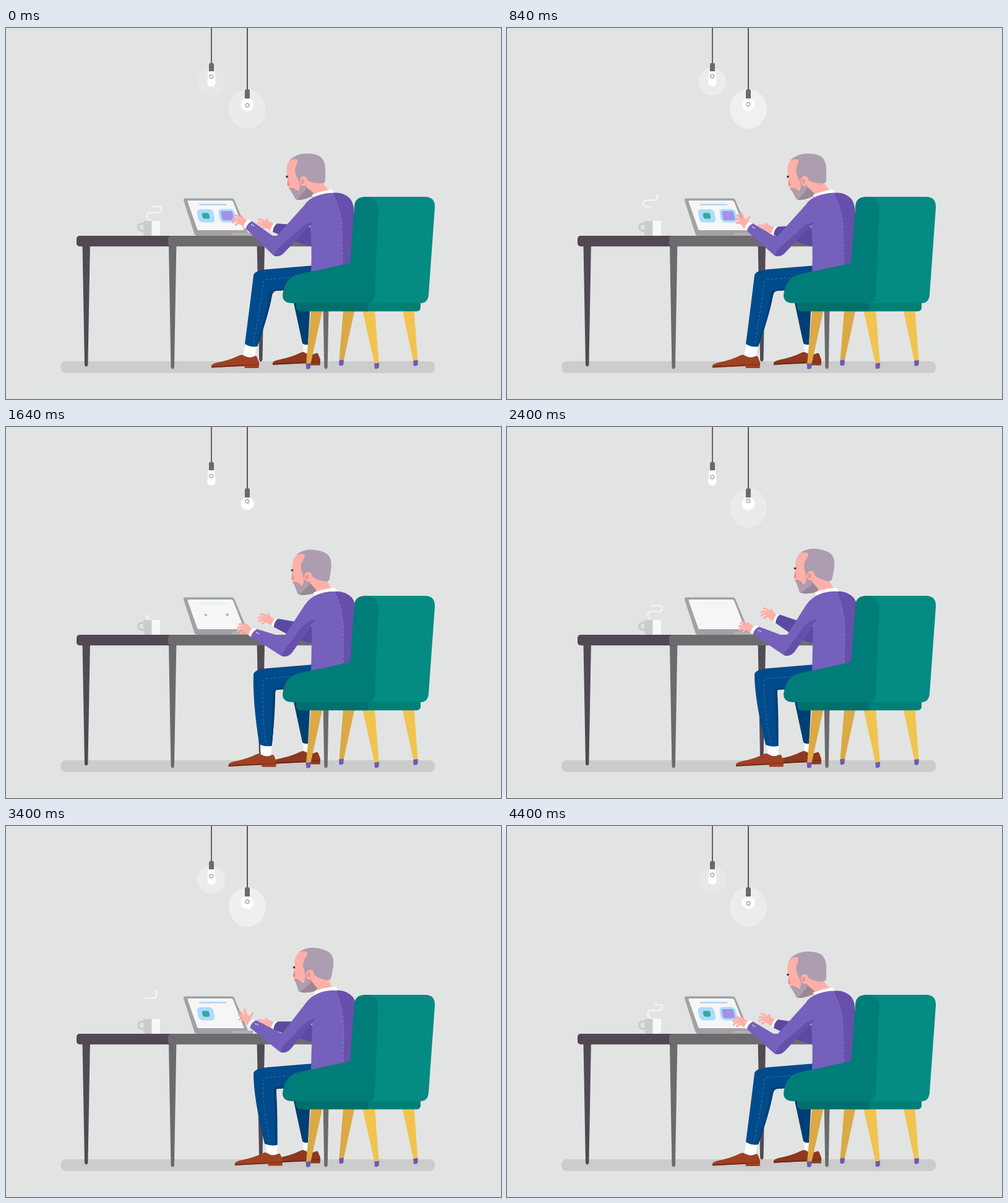
Write an HTML page with a canvas that moves like this. It is 800 by 600 pixels and loops after 4.48 s.

```html
<!DOCTYPE html>
<html lang="en">
<head>
<meta charset="utf-8">
<title>Working at the desk</title>
<style>
html, body { margin: 0; width: 100%; height: 100%; overflow: hidden; background: #e2e4e3; }
canvas { display: block; }
</style>
</head>
<body>
<canvas id="stage" width="800" height="600"></canvas>
<script>
const LOOP = 4480;
const g = document.getElementById('stage').getContext('2d');
const SKIN = '#ffb0a8', PURPLE = '#7560bc', SHADE = '#6650ab';

const mix = (a, b, k) => a + (b - a) * k;
const wave = (t, period, peak) => Math.cos(2 * Math.PI * (t - peak) / period);
const ease = (t, from, to) => {
  const k = Math.min(1, Math.max(0, (t - from) / (to - from)));
  return (1 - Math.cos(Math.PI * k)) / 2;
};

// Linear value between [time, value] pairs
function track(t, keys) {
  if (t <= keys[0][0]) return keys[0][1];
  for (let i = 1; i < keys.length; i++) {
    const [t0, a] = keys[i - 1], [t1, b] = keys[i];
    if (t <= t1) return mix(a, b, (t - t0) / (t1 - t0));
  }
  return keys[keys.length - 1][1];
}

function fill(color, d) {
  g.fillStyle = color;
  g.fill(new Path2D(d));
}

function line(color, width, d, dash = []) {
  g.strokeStyle = color;
  g.lineWidth = width;
  g.setLineDash(dash);
  g.stroke(new Path2D(d));
  g.setLineDash([]);
}

function box(color, x, y, w, h, r) {
  g.fillStyle = color;
  g.beginPath();
  g.roundRect(x, y, w, h, r);
  g.fill();
}

function oval(color, x, y, rx, ry = rx) {
  g.fillStyle = color;
  g.beginPath();
  g.ellipse(x, y, rx, ry, 0, 0, 7);
  g.fill();
}

function ring(x, y) {
  g.strokeStyle = '#77777a';
  g.lineWidth = 1;
  g.beginPath();
  g.arc(x, y, 3, 0, 7);
  g.stroke();
}

function lamps(t) {
  const glow1 = track(t, [[0, .14], [400, .28], [840, .32], [1500, 0], [2600, 0], [3200, .3], [3840, .26], [4480, .14]]);
  const glow2 = track(t, [[0, .28], [840, .42], [1640, .04], [1900, .04], [2400, .22], [3100, .42], [3840, .36], [4480, .28]]);
  oval(`rgba(255,255,255,${glow1})`, 331.7, 87, 22.5);
  oval(`rgba(255,255,255,${glow2})`, 390, 131, 30, 32);
  box('#6d5f66', 331, 0, 2, 58, 0);
  box('#58575b', 389, 0, 2, 101, 0);
  fill('#fff', 'M327 69 H336.5 L338.5 88 Q338.5 94.5 332 94.5 Q325 94.5 325.3 88 Z');
  oval('#fff', 390, 123.7, 10.6);
  box('#6a6a6d', 328, 56.5, 8, 13.5, [3, 3, 0, 0]);
  box('#6a6a6d', 386, 99, 8, 15, [3, 3, 0, 0]);
  ring(331.8, 79.8 + 1.8 * wave(t, LOOP, 2900));
  ring(390, 122.2 + 2.9 * wave(t, LOOP, 0));
}

const STEAM = 'M238 313 Q229 311 228 306 Q226 299 233 298.5 H245 Q251 298 251 293.5 Q251 289 246 289 H227 Q220 289 220 284 Q220 278.5 226 278.5 H238 Q243 278 243 273 V265';
const steamPath = document.createElementNS('http://www.w3.org/2000/svg', 'path');
steamPath.setAttribute('d', STEAM);
const steamLength = steamPath.getTotalLength();

function steam(t) {
  const half = LOOP / 2;
  for (const u of [t % half, t % half + half]) {
    const head = track(u, [[1480, 0], [1640, .13], [2160, .5], [2400, .55], [3080, .96], [3150, 1]]);
    const tail = track(u, [[2160, 0], [2400, .06], [3080, .54], [3400, .74], [3860, 1]]);
    if (head <= tail) continue;
    const a = tail * steamLength, b = head * steamLength;
    line('#f3f4f4', 2.6, STEAM, [0, a, b - a, 2 * steamLength]);
  }
}

function mug() {
  g.strokeStyle = '#cbcccc';
  g.lineWidth = 3.6;
  g.beginPath();
  g.roundRect(214, 316.5, 15, 11.5, 5.5);
  g.stroke();
  box('#cbcccc', 222, 312, 15, 24, [1, 0, 0, 4]);
  box('#f8f8f8', 235.5, 312, 13.5, 24, [0, 1, 4, 0]);
}

function table() {
  box('#cbcccb', 88.5, 539, 604.5, 19, 8);
  const leg = (color, x, bottom) => fill(color,
    `M${x - 6.2} 350 H${x + 6.2} L${x + 2.7} ${bottom - 3} Q${x} ${bottom + 2} ${x - 2.7} ${bottom - 3} Z`);
  leg('#524a54', 129.7, 548);
  leg('#6b6a6e', 269.2, 552);
  leg('#524a54', 411.8, 540);
  leg('#6b6a6e', 517, 552);
  box('#524853', 114, 336, 160, 17.2, 5);
  box('#6d6b70', 262, 336, 258, 17.2, 5);
}

function icon(x, y, size, color, w, h) {
  if (size <= 0) return;
  g.save();
  g.transform(1, 0, .2, 1, x, y);
  g.scale(size, size);
  box('#abdcfc', -13.2, -10.8, 26.4, 21.6, 6);
  box(color, -w / 2, -h / 2, w, h, 3);
  g.restore();
}

function laptop(t) {
  fill('#a2a2a4', 'M290 275.5 H365 Q368 275.5 369 278 L391 331 H399 V336 H309 Q305.5 336 304.5 333 L287 279 Q286.5 275.5 290 275.5 Z');
  fill('#f6f6f7', 'M295 279 H364 Q366 279 367 281 L385 327 H311 Q309.5 327 309 325 L293.5 281 Q293 279 295 279 Z');
  box('#b0b0b2', 366, 331, 32, 4.5, 1);
  const bar = track(t, [[1360, 1], [1700, .3], [2400, .35], [2750, 1]]);
  g.globalAlpha = bar;
  box('#abdcfc', 312, 285.7 - 1.4 * bar, 44.5, 2.8 * bar, 1.2 * bar);
  g.globalAlpha = 1;
  const out = [[1360, 1], [1700, 0]];
  icon(323, 303.8, track(t, [...out, [2950, 0], [3150, 1.1], [3260, 1]]), '#39a79c', 11.5, 9.5);
  icon(357.8, 303.6, track(t, [...out, [3450, 0], [3780, 1.11], [3930, 1]]), '#a193ea', 19, 15);
}

// Hand with its wrist at x, y; open spreads the fingers
function hand(x, y, angle, open) {
  g.save();
  g.translate(x, y);
  g.rotate(angle * Math.PI / 180);
  g.lineCap = 'round';
  const finger = (bx, by, cx, cy, tx, ty) => line(SKIN, 3.4, `M${bx} ${by} Q${cx} ${cy} ${tx} ${ty}`);
  finger(-9, -10, -15, -15, mix(-20, -17, open), mix(-13, -19, open));
  finger(-11, -8, -19, -11, mix(-22, -22, open), mix(-7.5, -13, open));
  finger(-11, -5, -19, -7, mix(-22, -22, open), mix(-2, -7, open));
  finger(-8, -2, -14, -3, mix(-17, -19, open), mix(1, -1, open));
  finger(-4, -6, -5, -10, mix(-9, -2, open), mix(-12, -17.5, open));
  fill(SKIN, 'M3 -5 Q-2 -10 -8 -12 Q-13 -12 -14 -8 Q-15 -3 -10 0 Q-6 4 -2 4 Z');
  g.lineCap = 'butt';
  g.restore();
}

function farArm(p, s) {
  const k = 1 - s;
  const x = mix(436, 437 + 2 * k, p);
  const y = mix(321.5 - 9.5 * k, 316.5 - 13 * k, p);
  hand(x - 6, y + 6, mix(-20, 4, k), .3);
  fill('#fff', `M${x - 3} ${y - .5} L${x + 2} ${y + 1} L${x - 4} ${y + 14} L${x - 9} ${y + 11} Q${x - 7} ${y + 4} ${x - 3} ${y - .5} Z`);
  const by = mix(352, 348, p);
  fill('#5a4aa2', `M${x + 2} ${y} L478 ${mix(319, 316, p)} L503 325 V${by + 2} L488 ${by} L470 ${by - 6} L${x - 5} ${y + 13.5} Q${x - 4} ${y + 4} ${x + 2} ${y} Z`);
}

function shoe(dx, dy, main, sole) {
  g.save();
  g.translate(dx, dy);
  fill(main, 'M332 546 Q333 543 342 541 Q362 537 376 530 Q381 527 385 530 Q393 535 401 531 Q405 529 406 533 L409 541 V546 L332 549 Z');
  fill(sole, 'M332 547 L409 543.5 V545 L332 549.5 Z');
  fill(main, 'M385 545.5 L409 544.5 L408.5 550 H386 Z');
  g.restore();
}

function legs(p) {
  fill('#fff', 'M480 509 L489 509 L488 526 Q483 528 481 524 Z');
  shoe(99, -4.5, '#8d381f', '#6d2a1b');
  fill('#003f74', 'M464 440 H492 L488 512 Q482 513 479 510 Z');
  const m = (a, b) => mix(a, b, p);
  fill('#fff', `M${m(387, 420)} 512 L${m(405, 439)} 513 L${m(402, 438)} 531 Q${m(393, 430)} 535 ${m(383, 422)} 530 Z`);
  shoe(38 * p, -.5 * p, '#9f4123', '#7c2d1d');
  const inner = `${m(430, 436)} ${m(432, 429)} Q${m(432, 436)} 425 ${m(437, 440)} 425 L452 424`;
  fill('#004b8c', `M498 384 L425 390 Q401 392 400 400 Q${m(394, 400)} ${m(450, 440)} ${m(386, 418)} ${m(511, 514)} Q${m(396, 428)} ${m(517, 518)} ${m(406, 438.5)} ${m(515, 516)} Q${m(424, 438)} ${m(465, 470)} ${inner} L498 424 Z`);
  fill('#003f74', `M${m(404, 436)} 515 Q${m(421, 434)} 465 ${m(427, 433)} 424 L452 420 V424 L437 425 Q${m(432, 437)} 425 ${m(430, 437)} 432 Q${m(424, 439)} 465 ${m(406, 438.5)} 515 Z`);
  line('#3a77ad', .9, `M472 402.5 L419 407 Q416 408 415.5 413 Q${m(410, 415)} 460 ${m(399, 427)} 513`, [4, 3]);
}

function head(p) {
  g.save();
  g.translate(470 + 5 * p, 277 - 9.5 * p);
  g.rotate(.175 * p);
  g.translate(-470, -277);
  fill(SKIN, 'M478 245 H513 L511 252 Q516 258 526 265 L498 277 L484 262 Z');
  fill(SKIN, 'M470 209 Q456 212 454 222 Q452 232 455 241 L454.5 254 Q457 257 458 262 L478 268 L484 240 V212 Z');
  fill('#ef8a8c', 'M455.5 244 L458.5 254 Q456 257 454.5 254.5 Z');
  fill('#3a3157', 'M452 239.5 L455.5 238.5 V242 Q452 243 452 239.5 Z');
  fill('#9a8795', 'M458 259 Q464 257 469 262 Q474 266 475 258 L477 249 L497 266 L494 272 Q482 278 473 278 Q467 278 466 273 Z');
  fill('#ad9db0', 'M457 215 Q468 203 486 203 Q505 203 511 211 Q517 219 516 235 L515.5 248 Q514 252 508 251.5 Q495 251 488 247 L484 262 L470 278 Q467 277 466 272 L458 259 Q463 258 468 262 Q474 266 475 258 Q475 250 470 241 Q465 232 469 223 Q473 214 470 212.5 Q464 211 457 215 Z');
  fill('#9a8795', 'M475 274 Q484 270 489 260 L497 267 L495 272 Q482 278 471 278 Z');
  fill(SKIN, 'M484 240 L489 247 L512 251 L518 258 L498 268 L485 257 Z');
  fill('#ad9db0', 'M487 236 H516 L515.5 248 Q514 252 508 251.5 Q495 251 487 246 Z');
  oval(SKIN, 481, 247.5, 6.4, 8);
  oval('#f6918c', 479.2, 248, 2.5, 4);
  g.restore();
}

function torso(p) {
  const m = (a, b) => mix(a, b, p);
  fill('#fff', `M${m(494, 498)} ${m(270, 267)} Q${m(508, 514)} ${m(264, 261)} ${m(526, 533)} ${m(261, 260)} L${m(532, 539)} 268 L500 276 Z`);
  fill(PURPLE, `M${m(484, 487)} ${m(284, 283)} Q${m(494, 501)} ${m(271, 268)} ${m(520, 524)} ${m(267, 266)} Q${m(545, 548)} ${m(264, 264)} ${m(556, 560)} 276 Q${m(563, 567)} 285 ${m(562, 566)} 300 V395 H493 Q${m(495, 494)} 350 ${m(491, 495)} 315 Z`);
  const top = m(527, 533);
  const seam = `${top} ${m(267, 266)} Q${m(543, 545)} 295 ${m(543, 546)} 330 L${m(544, 545)} 386`;
  fill(SHADE, `M${seam} H562 L${m(562, 566)} 300 Q${m(563, 567)} 285 ${m(556, 560)} 276 Q${m(545, 548)} 264 ${top} ${m(267, 266)} Z`);
  line('#9182cb', .9, `M${seam}`, [4, 3]);
}

function nearArm(p, s, lift) {
  const m = (a, b) => mix(a, b, p);
  const wx = m(388.5, 400 - 8 * lift), wy = m(330 - 13 * lift, 334 - 23 * lift);
  const ex = m(438, 455 - 11 * lift), ey = m(369.7, 372.5 - 9 * lift);
  hand(wx, wy, 24 * s * s - 3, s * s);
  fill('#fff', `M${wx + 2} ${wy - 8} L${wx + 9} ${wy - 6} L${wx} ${wy + 7} L${wx - 5} ${wy + 4} Q${wx - 3} ${wy - 4} ${wx + 2} ${wy - 8} Z`);
  const ax = m(497, 502), ay = m(313, 310);
  const sx = m(484, 487), sy = m(284, 283);
  fill(PURPLE, `M${wx + 9} ${wy - 6} L${ex - 6} ${ey - 33} Q${ex - 3} ${ey - 31} ${ex} ${ey - 34} L${sx - 3} ${sy + 4} Q${sx + 4} ${sy - 5} ${sx + 12} ${sy - 7} L${ax} ${ay} L${ex + 12} ${ey - 7} Q${ex + 4} ${ey + 2} ${ex - 6} ${ey - 2} L${wx - 1} ${wy + 6} Q${wx + 2} ${wy - 3} ${wx + 9} ${wy - 6} Z`);
  fill(SHADE, `M${ax} ${ay} Q${ax - 14} ${ay + 3} ${ax - 23} ${ay + 13} L${ex + 3} ${ey - 15} Q${ex - 3} ${ey - 8} ${ex - 5} ${ey - 1.5} Q${ex + 4} ${ey + 2} ${ex + 12} ${ey - 7} L${ax - 5} ${ay + 6} Z`);
  oval('#f3d9dd', wx + 8.5, wy, 1.1);
  oval('#f3d9dd', wx + 11.5, wy + 1.4, 1.1);
}

function chair() {
  const leg = (color, x0, x1, foot, y) => {
    fill(color, `M${x0} 456 H${x1} L${foot + 3.6} ${y} H${foot - 3.6} Z`);
    fill('#7058b4', `M${foot - 3.8} ${y - 1} L${foot + 3.8} ${y - 2} L${foot + 3.4} ${y + 6} Q${foot} ${y + 9} ${foot - 3.4} ${y + 7} Z`);
  };
  leg('#dba945', 493, 511.5, 488.6, 544);
  leg('#dba945', 545, 563.5, 542, 538.5);
  leg('#f1c450', 576, 596, 599.2, 543.5);
  leg('#f1c450', 640.5, 659.5, 662, 539);
  box('#007f77', 560, 440, 110, 18.3, [0, 0, 6, 0]);
  box('#00706c', 469, 440, 116, 18.3, [0, 0, 0, 7]);
  fill('#048b83', 'M578 273 H677 Q694 273 693 291 L683 431 Q682 445 670 445 H570 Z');
  fill('#007c79', 'M563 288 Q564 273 581 273 Q602 274 601.5 294 L596 430 Q595 445 584 445 H463 Q447 445 447 432 Q449 414 460 404 Q466 399.5 478 397 L556 380.5 Z');
}

function draw(t) {
  const p = ease(t, 1120, 1920) - ease(t, 3640, 4400);
  const s = .5 + .5 * wave(t, 640, 170);
  const lift = .5 + .5 * wave(t, 640, 63);
  g.fillStyle = '#e2e4e3';
  g.fillRect(0, 0, 800, 600);
  lamps(t);
  table();
  steam(t);
  mug();
  laptop(t);
  farArm(p, s);
  legs(p);
  head(p);
  torso(p);
  nearArm(p, s, lift);
  chair();
}

const start = performance.now();
function tick() {
  draw((performance.now() - start) % LOOP);
  requestAnimationFrame(tick);
}
tick();
</script>
</body>
</html>
```
